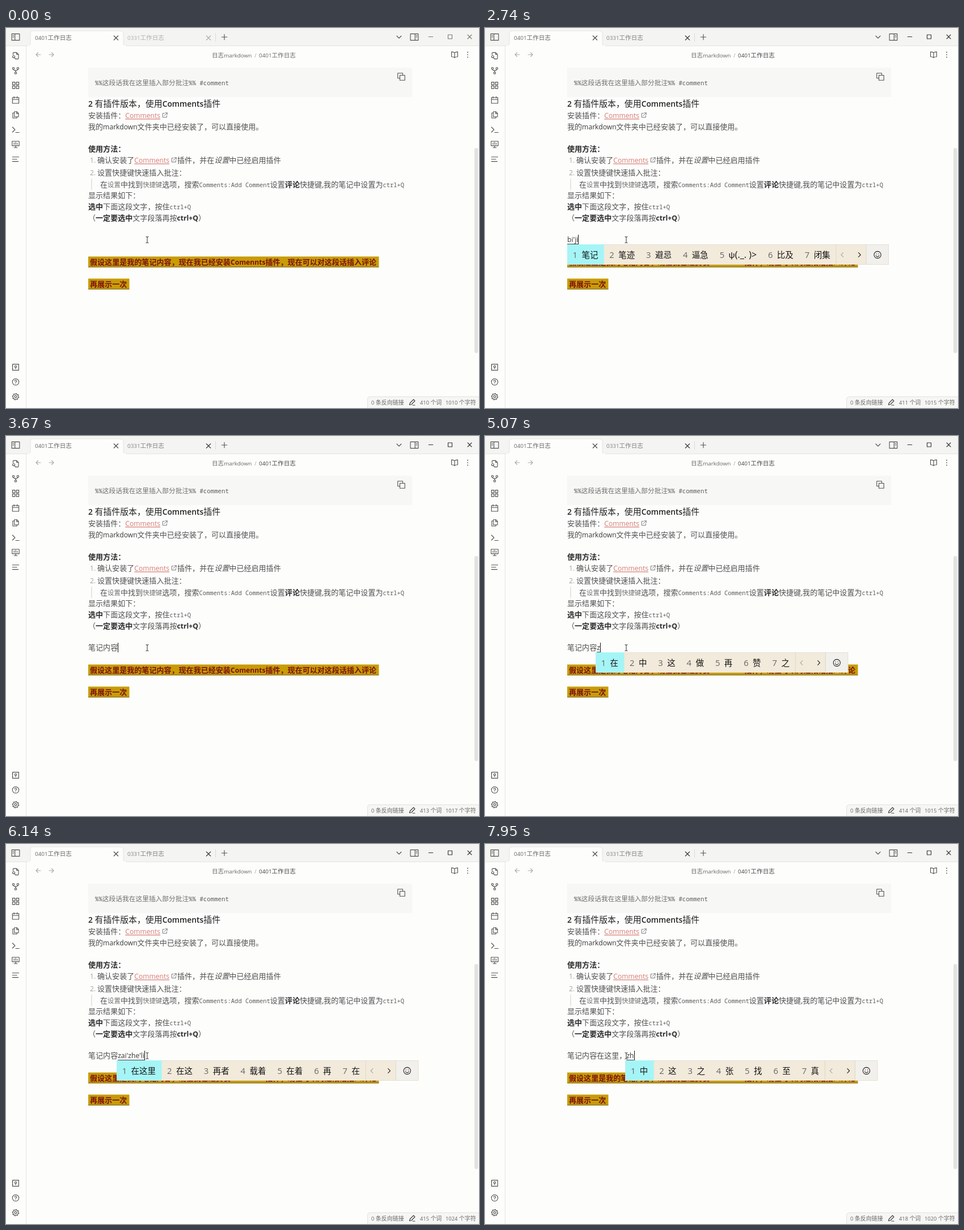
An HTML page that plays this animation: 834 by 671 pixels, repeating every 8 s.

```html
<!DOCTYPE html>
<html lang="zh-CN">
<head>
<meta charset="utf-8">
<title>工作日志</title>
<style>
html, body { margin: 0; width: 100%; height: 100%; overflow: hidden; background: #fdfdfc; }
svg { display: block; width: 834px; height: 671px; }
text { font-family: "Noto Sans CJK SC", "Noto Sans CJK", "Noto Sans", sans-serif; font-weight: 300; fill: #505050; white-space: pre; }
.latin { font-family: "Open Sans", "Noto Sans", sans-serif; font-size: .93em; font-weight: 400; fill: #383838; }
.bold { font-weight: 700; fill: #2a2a2a; }
.italic { font-style: italic; }
.code { font-size: .875em; fill: #707070; }
.code.latin { font-family: "Noto Sans Mono", "DejaVu Sans Mono", monospace; font-size: .8em; fill: #5c5c5c; }
.link.latin { fill: #d87d76; text-decoration: underline; }
.heading { font-weight: 500; fill: #222; }
.heading .latin { font-weight: 600; fill: #222; }
.mark, .mark .latin { font-weight: 700; fill: #7c1010; }
.ui { font-weight: 400; }
.ui .latin, .number .latin, .faint .latin, .candidate .latin { fill: inherit; }
.number, .muted { fill: #666; }
.faint { fill: #a4a4a4; }
.candidate { font-weight: 400; fill: #151515; }
.candidate .latin { font-size: 1.1em; }
.icon { fill: none; stroke: #505050; stroke-linecap: round; stroke-linejoin: round; }
</style>
</head>
<body>
<svg id="stage" viewBox="0 0 834 671"></svg>
<script>
const LOOP = 8000, FOCUS_TIME = 350, BLINK = 530, COUNT_LAG = 100;
const BODY = 13.05, LEFT = 145, LINE_Y = 378.4;
const stage = document.getElementById('stage');

function add(parent, tag, attrs = {}) {
  const node = document.createElementNS('http://www.w3.org/2000/svg', tag);
  for (const key in attrs) node.setAttribute(key, attrs[key]);
  return parent.appendChild(node);
}
const rect = (parent, x, y, width, height, fill, rx = 0) =>
  add(parent, 'rect', { x, y, width, height, fill, rx });
const stroke = (parent, d, color, width = 1) =>
  add(parent, 'path', { d, stroke: color, 'stroke-width': width, fill: 'none' });

// Inline styles: *bold*, ~italic~, `code`, [link].
const STYLES = { '*': 'bold', '~': 'italic', '`': 'code', '[': 'link' };
function fillText(node, content) {
  node.textContent = '';
  for (const part of content.split(/(\*[^*]+\*|~[^~]+~|`[^`]+`|\[[^\]]+\])/)) {
    const style = part.length > 1 && STYLES[part[0]] || '';
    const plain = style ? part.slice(1, -1) : part;
    for (const run of plain.match(/[ -~\u00a0]+|[^ -~\u00a0]+/g) || []) {
      const latin = /[ -~]/.test(run[0]) ? 'latin ' : '';
      add(node, 'tspan', { class: latin + style }).textContent = run;
    }
  }
  return node;
}
const text = (parent, x, y, size, content, cls = '') =>
  fillText(add(parent, 'text', { x, y, 'font-size': size, class: cls }), content);

const ring = (x, y, r) => `M${x - r} ${y}a${r} ${r} 0 1 0 ${2 * r} 0a${r} ${r} 0 1 0 ${-2 * r} 0`;
const box = (x, y, w, h) => `M${x} ${y}h${w}v${h}h${-w}z`;
const gear = () => {
  const points = [];
  for (let i = 0; i < 32; i++) {
    const r = i % 4 < 2 ? 10.5 : 8, a = (i + .5) * Math.PI / 16;
    points.push(`${12 + r * Math.cos(a)} ${12 + r * Math.sin(a)}`);
  }
  return `M${points.join('L')}z`;
};

const ICONS = {
  sidebar: box(1, 3, 22, 18) + 'M10 3v18M4 8h3M4 12h3',
  sidebarRight: box(1, 3, 22, 18) + 'M14 3v18M17 8h3M17 12h3',
  search: 'M4 9V4a2 2 0 0 1 2-2h9l6 6v12a2 2 0 0 1-2 2h-7M15 2v6h6' + ring(6, 15, 3.5) + 'M8.5 18l3 4',
  graph: ring(5, 5, 3) + ring(19, 5, 3) + ring(12, 20, 3) + 'M5 8c0 4 3 4 7 4s7 0 7-4M12 12v5',
  grid: box(2, 2, 8, 8) + box(14, 2, 8, 8) + box(2, 14, 8, 8) + box(14, 14, 8, 8),
  calendar: box(2, 4, 20, 18) + 'M2 10h20M7 1v5M17 1v5',
  files: 'M8 2h8l5 5v11H8zM15 2v6h6M8 6H3v16h13v-4',
  terminal: 'M2 4l8 8-8 8M12 21h11',
  board: box(1, 2, 22, 14) + 'M7 7v5M12 5v7M17 8v4M12 16v6M7 22h10',
  lines: 'M2 5h20M2 12h14M2 19h18',
  vault: box(2, 2, 20, 20) + ring(12, 10, 3) + 'M12 13v4M1 7h2M1 17h2',
  help: ring(12, 12, 10.5) + 'M9 9c0-4 6-4 6 0 0 3-3 2-3 5M12 17.5v.5',
  gear: gear() + ring(12, 12, 3.5),
  chevron: 'M6 9l6 6 6-6',
  minimize: 'M6 12h12',
  square: box(6, 6, 12, 12),
  close: 'M6 6l12 12M18 6L6 18',
  plus: 'M12 4v16M4 12h16',
  back: 'M20 12H4M11 5l-7 7 7 7',
  forward: 'M4 12h16M13 5l7 7-7 7',
  book: 'M12 6C9 3 5 3 2 3v16c4 0 7 0 10 3 3-3 6-3 10-3V3c-3 0-7 0-10 3v16',
  more: 'M12 4v.5M12 12v.5M12 20v.5',
  copy: box(8, 8, 14, 14) + 'M16 8V2H2v14h6',
  external: 'M10 4H3v17h17v-7M14 2h8v8M22 2L10 14',
  pencil: 'M3 21l2-7L17 2l5 5L10 19zM14 22h8',
  left: 'M15 5l-7 7 7 7',
  right: 'M9 5l7 7-7 7',
  smile: ring(12, 12, 10.5) + 'M7 14c2 5 8 5 10 0M8.5 8.5v1M15.5 8.5v1'
};
function icon(parent, name, x, y, size = 14, color = '#505050', weight = 1.1) {
  const scale = size / 24;
  return add(parent, 'path', {
    class: 'icon', d: ICONS[name], style: `stroke:${color}`, 'stroke-width': weight / scale,
    transform: `translate(${x - size / 2} ${y - size / 2}) scale(${scale})`
  });
}

// Window frame and tabs
rect(stage, 0, 0, 834, 671, '#fdfdfc');
rect(stage, 0, 0, 834, 31, '#f4f4f2');
stroke(stage, 'M0 31.5H834M35.5 32V671', '#e4e4e2');
add(stage, 'path', { d: 'M38 32q5 0 5-5V11q0-6 6-6H201q6 0 6 6V27q0 5 5 5z', fill: '#fdfdfc', stroke: '#e4e4e2' });
rect(stage, 38, 31, 174, 2, '#fdfdfc');
stroke(stage, 'M369.5 9V24', '#dcdcda');
text(stage, 51, 21.3, 10.6, '0401工作日志', 'ui muted');
const otherTab = text(stage, 214, 21.3, 10.6, '0331工作日志', 'ui');
icon(stage, 'sidebar', 17, 16, 15);
icon(stage, 'close', 194, 17.5, 15, '#444');
icon(stage, 'plus', 385, 16, 14);
icon(stage, 'chevron', 693, 16, 16);
icon(stage, 'sidebarRight', 720, 16, 15);
const windowIcons = [
  icon(stage, 'close', 357, 17.5, 15),
  icon(stage, 'minimize', 749, 15.5, 15),
  icon(stage, 'square', 783, 15.5, 14),
  icon(stage, 'close', 817.5, 15.5, 14)
];

// Ribbon and view header
['search', 'graph', 'grid', 'calendar', 'files', 'terminal', 'board', 'lines']
  .forEach((name, i) => icon(stage, name, 17, 49 + i * 26.1, 13.5));
['vault', 'help', 'gear'].forEach((name, i) => icon(stage, name, 17, 599 + i * 26, 13));
icon(stage, 'back', 57, 47, 12, '#aaa');
icon(stage, 'forward', 80, 47, 12, '#aaa');
icon(stage, 'book', 791, 47, 13);
icon(stage, 'more', 814, 47, 13, '#505050', 1.7);
text(stage, 363, 51.5, 10.6, '日志markdown', 'ui muted');
text(stage, 438, 51.5, 10.6, '/', 'ui faint');
const pageTitle = text(stage, 446, 51.5, 10.6, '0401工作日志', 'ui');

// Note
rect(stage, 145, 70, 571, 52, '#f7f7f6');
icon(stage, 'copy', 697, 86, 15);
text(stage, 157, 101, 13.4, '`%%这段话我在这里插入部分批注%% #comment`');
text(stage, LEFT, 138.5, 14.9, '2 有插件版本，使用Comments插件', 'heading');
[
  [145, 159.2, '安装插件：[Comments]'],
  [145, 178.8, '我的markdown文件夹中已经安装了，可以直接使用。'],
  [145, 218.1, '*使用方法：*'],
  [161, 238.3, '确认安装了[Comments]'],
  [302, 238.3, '插件，并在~设置~中已经启用插件'],
  [161, 259.5, '设置快捷键快速插入批注：'],
  [166, 280.7, '在`设置`中找到`快捷键`选项，搜索`Comments:Add Comment`设置*评论*快捷键,我的笔记中设置为`ctrl+Q`'],
  [145, 300.3, '显示结果如下：'],
  [145, 320, '*选中*下面这段文字，按住`ctrl+Q`'],
  [145, 339.7, '（*一定要选中*文字段落再按*ctrl+Q*）']
].forEach(([x, y, content]) => text(stage, x, y, BODY, content));
text(stage, 148, 238.3, BODY, '1.', 'faint');
text(stage, 148, 259.5, BODY, '2.', 'faint');
icon(stage, 'external', 280, 154, 10, '#777', 1);
icon(stage, 'external', 296, 233, 10, '#777', 1);
stroke(stage, 'M151 266V286', '#dededc', 1.5);
[[403.5, 512.5, '假设这里是我的笔记内容，现在我已经安装Comennts插件，现在可以对这段话插入评论'], [442.5, 72.5, '再展示一次']]
  .forEach(([y, width, content]) => {
    rect(stage, LEFT, y, width, 19, '#c79c05');
    rect(stage, LEFT, y + 18, width, 1, '#7d672c');
    text(stage, 148, y + 14.3, BODY, content, 'mark');
  });
rect(stage, 826, 212, 6.5, 362, '#e2e2e0', 3);

// Status bar
add(stage, 'path', { d: 'M637.5 672V656q0-5 5-5H835V672z', fill: '#f6f6f4', stroke: '#e2e2e0' });
text(stage, 644, 664.5, 10, '0 条反向链接', 'ui muted');
icon(stage, 'pencil', 716, 661, 12, '#444', 1.2);
const wordCount = text(stage, 730, 664.5, 10, '', 'ui muted');
const charCount = text(stage, 775, 664.5, 10, '', 'ui muted');

// Typed line, input method bar, pointer
const typedLine = text(stage, LEFT, LINE_Y, BODY, '');
const underline = rect(stage, LEFT, 381, 0, 1, '#444');
const caret = rect(stage, LEFT, 365, 1, 17, '#111');
const bar = add(stage, 'g');
stroke(stage, 'M246.5 368.5q2 0 2.5 1q.5-1 2.5-1M249 369.5v9M246.5 379.5q2 0 2.5-1q.5 1 2.5 1', '#444', 1.1);

// [start ms, committed text, composition, candidates]
const STEPS = [
  [0, '', ''],
  [1950, '', 'b'],
  [2050, '', 'b', '不 吧 把 被 比 帮 别'],
  [2220, '', 'bi', '比 笔 必 逼 币 闭 毕'],
  [2400, '', "bi'j", '比较 毕竟 笔记 比 笔 必 闭'],
  [2560, '', "bi'ji", '笔记 笔迹 避忌 逼急 ψ(._.\u00a0)> 比及 闭集'],
  [2900, '笔记', ''],
  [3050, '笔记', 'n', '你 那 呢 年 能 内 您'],
  [3170, '笔记', 'ne', '呢 哪 内 那 讷 馁 呐'],
  [3290, '笔记', 'nei', '内 那 馁 哪 氖 呢 嫩'],
  [3420, '笔记', "nei'r", '内容 内人 内燃 内热 内 那 馁'],
  [3600, '笔记内容', ''],
  [4930, '笔记内容', 'z', '在 中 这 做 再 赞 之'],
  [5160, '笔记内容', 'za', '咱 杂 咋 砸 扎 匝 咂'],
  [5310, '笔记内容', 'zai', '在 再 载 仔 灾 宰 栽'],
  [5460, '笔记内容', "zai'z", '在做 在这 再走 在 再 载 仔'],
  [5590, '笔记内容', "zai'zh", '在这 再者 载着 在着 在 再 载'],
  [5730, '笔记内容', "zai'zhe", '在这 再者 载着 在着 再 在 载'],
  [5880, '笔记内容', "zai'zhe'l", '在这里 在这 再者 载着 在着 再 在'],
  [6010, '笔记内容', "zai'zhe'li", '在这里 在这 再者 载着 在着 再 在'],
  [6400, '笔记内容在这里', ''],
  [6850, '笔记内容在这里，', ''],
  [7650, '笔记内容在这里，', 'z', '在 中 这 做 再 赞 之'],
  [7800, '笔记内容在这里，', 'zh', '中 这 之 张 找 至 真']
];
const stepAt = t => STEPS.findLast(step => step[0] <= t) || STEPS[0];

function drawBar(start, candidates) {
  bar.textContent = '';
  if (!candidates) return;
  const left = Math.max(LEFT, start - 2);
  const back = rect(bar, left, 382, 0, 36, '#f2eadb');
  const border = stroke(bar, '', '#e2dccf', .8);
  let x = left;
  candidates.split(' ').forEach((word, i) => {
    const cell = i ? null : rect(bar, x, 382, 0, 36, '#a6f5f6');
    text(bar, x + 9.5, 406.4, 16, String(i + 1), 'number');
    const label = text(bar, x + 25.4, 406.4, 14.5, word, 'candidate');
    const width = 35.8 + label.getComputedTextLength();
    if (cell) cell.setAttribute('width', width);
    x += width;
  });
  back.setAttribute('width', x + 93 - left);
  border.setAttribute('d', box(left + .5, 382.5, x + 92 - left, 35));
  rect(bar, x + 53, 383, 39, 34, '#f2f0ec');
  stroke(bar, `M${x} 382v36M${x + 53} 382v36`, '#dfd8cb');
  icon(bar, 'left', x + 11, 400.5, 13, '#aaa');
  icon(bar, 'right', x + 41, 400.5, 13, '#222');
  icon(bar, 'smile', x + 73, 400.5, 14, '#222');
}

function drawTyping([, committed, composing, candidates]) {
  const start = LEFT + (committed ? fillText(typedLine, committed).getComputedTextLength() : 0);
  fillText(typedLine, committed + composing);
  const end = committed + composing ? LEFT + typedLine.getComputedTextLength() : LEFT;
  underline.setAttribute('x', start);
  underline.setAttribute('width', composing ? end - start : 0);
  caret.setAttribute('x', Math.round(end));
  drawBar(start, candidates);
}

function drawCounts([, committed, composing]) {
  const words = 410 + committed.replace('，', '').length + (composing.length > 1 ? 1 : 0);
  fillText(wordCount, `${words} 个词`);
  fillText(charCount, `${1010 + committed.length + composing.length} 个字符`);
}

function drawFocus(focused) {
  otherTab.style.fill = focused ? '#808080' : '#b0b0b0';
  pageTitle.style.fill = focused ? '#444' : '#666';
  windowIcons.forEach((node, i) => node.style.stroke = focused ? '#333' : i ? '#777' : '#aaa');
}

const shown = {};
function update(key, value, draw) {
  if (shown[key] === value) return;
  shown[key] = value;
  draw(value);
}

function frame() {
  const t = performance.now() % LOOP;
  const step = stepAt(t);
  update('focus', t >= FOCUS_TIME, drawFocus);
  update('typing', step, drawTyping);
  update('counts', stepAt(t - COUNT_LAG), drawCounts);
  const idle = t - Math.max(step[0], FOCUS_TIME);
  const caretOn = idle >= 0 && (step[2] || Math.floor(idle / BLINK) % 2 === 0);
  caret.setAttribute('visibility', caretOn ? 'visible' : 'hidden');
  requestAnimationFrame(frame);
}
frame();
</script>
</body>
</html>
```
